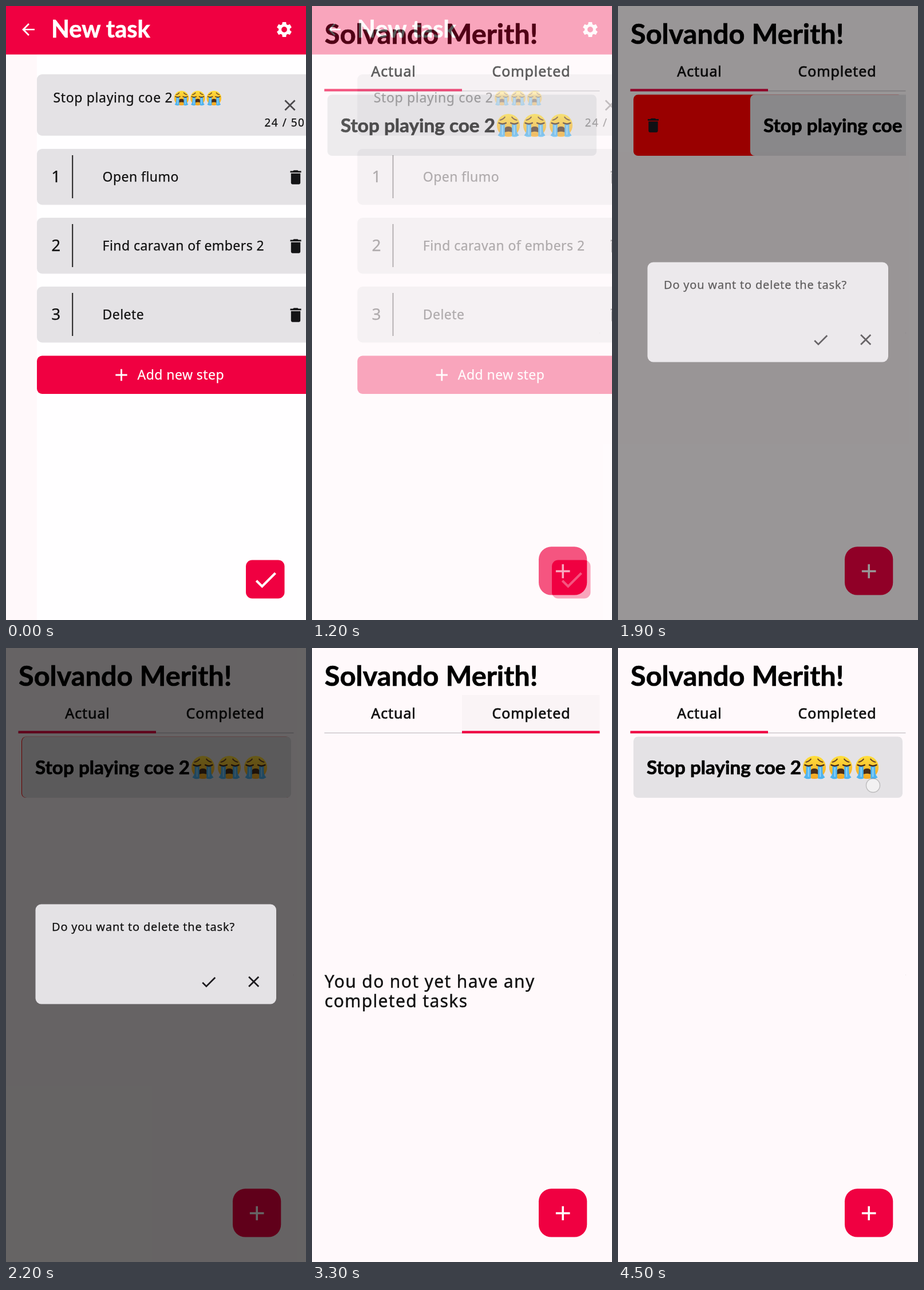
These frames come from a looping animation (524x1070 px, 5100 ms). An HTML page:

```html
<!DOCTYPE html>
<html lang="en">
<head>
<meta charset="utf-8">
<title>Task list</title>
<style>
  html, body { margin: 0; width: 100%; height: 100%; overflow: hidden; background: #fff9fb; }
  svg { display: block; width: 100vw; height: 100vh; }
  text { font-family: "Noto Sans", "Open Sans", sans-serif; font-size: 23px; letter-spacing: .45px; fill: #111; stroke: #111; stroke-width: .25px; white-space: pre; }
  .head { font-family: Lato, "Open Sans", sans-serif; font-weight: 700; letter-spacing: 0; fill: #000; stroke: #000; stroke-width: .7px; }
  .tab { font-size: 25px; letter-spacing: .9px; text-anchor: middle; stroke-width: .7px; }
  .num { font-size: 28px; text-anchor: middle; }
  .note { font-size: 30px; letter-spacing: 1.35px; stroke-width: .4px; }
  .white { fill: #fff; stroke: #fff; }
  .red { fill: #f00041; }
  .alarm { fill: #f00; }
  .card { fill: #e4e2e5; }
</style>
</head>
<body>
<svg viewBox="0 0 524 1070" preserveAspectRatio="none">
  <defs>
    <linearGradient id="skin" x1="0" y1="0" x2="0" y2="1">
      <stop offset="0" stop-color="#ffdf3c"/><stop offset="1" stop-color="#f5a623"/>
    </linearGradient>
    <g id="cry">
      <circle r="19.5" fill="url(#skin)"/>
      <path d="M-14 -9Q-9 -10 -6 -14M14 -9Q9 -10 6 -14" fill="none" stroke="#6b4423" stroke-width="2" stroke-linecap="round"/>
      <path d="M-7 12V7Q-6 2 0 2Q6 2 7 7V12Q0 9 -7 12Z" fill="#4a2d18"/>
      <path d="M-14 -3H-6V19Q-13 21 -18 17Q-14 13 -14 7ZM14 -3H6V19Q13 21 18 17Q14 13 14 7Z" fill="#4fb3ef"/>
      <path d="M-10 0V16M10 0V16" fill="none" stroke="#8fd4fb" stroke-width="2"/>
      <path d="M-16 -4Q-10 -1 -4 -4M16 -4Q10 -1 4 -4" fill="none" stroke="#4a2d18" stroke-width="2.4" stroke-linecap="round"/>
    </g>
    <path id="back" d="M20 11H7.83l5.59-5.59L12 4l-8 8 8 8 1.41-1.41L7.83 13H20z"/>
    <path id="gear" d="M19.14 12.94c.04-.3.06-.61.06-.94 0-.32-.02-.64-.07-.94l2.03-1.58c.18-.14.23-.41.12-.61l-1.92-3.32c-.12-.22-.37-.29-.59-.22l-2.39.96c-.5-.38-1.03-.7-1.62-.94l-.36-2.54c-.04-.24-.24-.41-.48-.41h-3.84c-.24 0-.43.17-.47.41l-.36 2.54c-.59.24-1.13.57-1.62.94l-2.39-.96c-.22-.08-.47 0-.59.22L2.74 8.87c-.12.21-.08.47.12.61l2.03 1.58c-.05.3-.09.63-.09.94s.02.64.07.94l-2.03 1.58c-.18.14-.23.41-.12.61l1.92 3.32c.12.22.37.29.59.22l2.39-.96c.5.38 1.03.7 1.62.94l.36 2.54c.05.24.24.41.48.41h3.84c.24 0 .44-.17.47-.41l.36-2.54c.59-.24 1.13-.56 1.62-.94l2.39.96c.22.08.47 0 .59-.22l1.92-3.32c.12-.22.07-.47-.12-.61zM12 15.6a3.6 3.6 0 1 1 0-7.2 3.6 3.6 0 0 1 0 7.2z"/>
    <path id="bin" d="M6 19c0 1.1.9 2 2 2h8c1.1 0 2-.9 2-2V7H6zM19 4h-3.5l-1-1h-5l-1 1H5v2h14z"/>
    <path id="close" d="M19 6.41L17.59 5 12 10.59 6.41 5 5 6.41 10.59 12 5 17.59 6.41 19 12 13.41 17.59 19 19 17.59 13.41 12z"/>
    <path id="tick" d="M9 16.17L4.83 12l-1.42 1.41L9 19 21 7l-1.41-1.41z"/>
    <path id="plus" d="M19 13h-6v6h-2v-6H5v-2h6V5h2v6h6z"/>
    <path id="pen" d="M3 17.25V21h3.75L17.81 9.94l-3.75-3.75zM20.71 7.04a1 1 0 0 0 0-1.41l-2.34-2.34a1 1 0 0 0-1.41 0l-1.83 1.83 3.75 3.75z"/>
    <clipPath id="pager"><rect x="21" y="149" width="482" height="921"/></clipPath>
  </defs>

  <rect width="524" height="1070" fill="#fff9fb"/>
  <g id="home"></g>
  <g id="dialog"></g>
  <g id="editor"></g>
  <circle id="touch" fill="#fff" fill-opacity=".5" stroke="#777" stroke-opacity=".4" stroke-width="1.4"/>
</svg>
<script>
const $ = id => document.getElementById(id);
const LOOP = 5100, STEP = 100, PAGE = 481;

const icon = (id, cx, cy, fill, s = 1.364) =>
  `<use href="#${id}" fill="${fill}" transform="translate(${cx} ${cy}) scale(${s}) translate(-12 -12)"/>`;
const box = (x, y, w, h, r, cls) =>
  `<rect class="${cls}" x="${x}" y="${y}" width="${w}" height="${h}" rx="${r}"/>`;
const text = (x, y, str, cls = "", style = "") =>
  `<text x="${x}" y="${y}" class="${cls}" style="${style}">${str}</text>`;
const tears = (x, y, gap, s) => [0, 1, 2].map(i =>
  `<use href="#cry" transform="translate(${x + i * gap} ${y}) scale(${s})"/>`).join("");

const stepRow = (label, i) => {
  const y = 249 + i * 120;
  return box(21.5, y, 481, 97.5, 9, "card") +
    text(55, y + 58, i + 1, "num") +
    `<path d="M83.7 ${y + 11}v75" stroke="#222" stroke-width="2"/>` +
    text(136, y + 57, label) +
    icon("bin", 473.5, y + 49.5, "#141416");
};

$("home").innerHTML =
  text(22, 66, "Solvando Merith!", "head", "font-size:48.7px") +
  `<rect id="ripple" y="82" width="240.5" height="66" fill="#000"/>` +
  text(142.5, 123, "Actual", "tab") + text(383, 123, "Completed", "tab") +
  `<path d="M21.5 148H502.5" stroke="#cdc9cc" stroke-width="1.4"/>` +
  `<rect id="mark" class="red" y="144.5" width="240.5" height="4.2"/>` +
  `<g clip-path="url(#pager)"><g id="pages">
     <g id="under">${box(27, 154.5, 470, 106.5, 8, "alarm")}
       ${icon("bin", 61.5, 208, "#1c1a22")}${icon("pen", 462.5, 208, "#2a2d35")}</g>
     <g id="task">${box(27, 154.5, 470, 106.5, 8, "card")}
       ${text(50, 220, "Stop playing coe 2", "head", "font-size:33.3px")}
       ${tears(343, 208, 46, 1.03)}</g>
     <g transform="translate(${PAGE} 0)">
       ${text(22, 592, "You do not yet have any", "note")}
       ${text(22, 625.5, "completed tasks", "note")}</g>
   </g></g>` +
  box(396, 942.3, 84.3, 84.3, 22, "red") + icon("plus", 438.2, 985, "#fff", 1.76);

$("dialog").innerHTML =
  `<rect width="524" height="1070" fill-opacity=".6"/>` +
  box(51.5, 446.5, 420.5, 174, 10, "card") +
  text(80, 492.5, "Do you want to delete the task?", "", "font-size:20px;letter-spacing:.8px") +
  icon("tick", 354, 582, "#1c1a1e") + icon("close", 432.7, 581.5, "#1c1a1e");

$("editor").innerHTML =
  `<rect width="524" height="1070" fill="#fffeff"/>
   <rect id="strip" y="84" height="986" fill="#fff8fa"/>
   <rect class="red" width="524" height="84.5"/>` +
  icon("back", 39, 41, "#fff") + icon("gear", 486, 41, "#fff") +
  text(79, 55, "New task", "head white", "font-size:41.5px") +
  `<g id="form">` +
  box(21.5, 119, 481, 107, 9, "card") +
  text(50, 168, "Stop playing coe 2", "", "letter-spacing:.65px") + tears(274, 160.5, 28.4, .66) +
  icon("close", 463.5, 173, "#4a484b") +
  text(419, 210, "24 / 50", "", "font-size:19px;letter-spacing:1.5px") +
  ["Open flumo", "Find caravan of embers 2", "Delete"].map(stepRow).join("") +
  box(21.5, 609.5, 481, 66.5, 9, "red") +
  icon("plus", 169, 643, "#fff", 1.45) + text(197, 651, "Add new step", "white") +
  `</g>` +
  box(419, 965.5, 67.5, 67, 11, "red") + icon("tick", 453.5, 1000, "#fff", 2.05);

const set = (id, attrs) => { for (const k in attrs) $(id).setAttribute(k, attrs[k]); };
const span = (t, a, b) => Math.min(1, Math.max(0, (t - a) / (b - a)));
const out = p => 1 - (1 - p) ** 3;

// [from, until, x, y, radius]
const taps = [
  [900, 1100, 45, 44, 14],
  [2300, 2500, 448, 583, 13],
  [3000, 3200, 383, 116, 12],
  [3600, 3800, 143, 116, 12],
  [4500, 5100, 445.5, 239.5, 12]
];

function swipe(t) {
  if (t < 1600 || t >= 2400) return 0;
  if (t < 1800) return 130 + 322 * span(t, 1600, 1700);
  return t < 2200 ? 481 * (1 - out(span(t, 1800, 2200))) + 1 : 1;
}

function draw(ms) {
  const t = Math.floor(ms / STEP) * STEP;

  // editor page settles in, then leaves to the right
  const enter = (1 - span(t, 0, 300)) ** 3, leave = span(t, 1000, 1300);
  const shift = 32.5 * enter + 60 * out(leave);
  set("form", { transform: `translate(${shift} 0)` });
  set("strip", { width: 21.5 + shift, opacity: enter });
  set("editor", { opacity: 1 - leave, visibility: leave < 1 ? "visible" : "hidden" });

  // swiped task
  const drag = swipe(t);
  set("task", { transform: `translate(${drag} 0)` });
  set("under", { visibility: drag > 0 ? "inherit" : "hidden" });

  set("dialog", { opacity: span(t, 1700, 2000) * (1 - span(t, 2400, 2600)) });

  // tab pager
  const tab = out(span(t, 3000, 3300)) - out(span(t, 3600, 3900));
  set("pages", { transform: `translate(${-PAGE * tab} 0)` });
  set("mark", { x: 21.5 + 240.5 * tab });
  const start = t < 3600 ? 3000 : 3600;
  const glow = t < start ? 0 : 1 - span(t, start + 200, start + 500);
  set("ripple", { x: t < 3600 ? 262 : 21.5, opacity: .03 * glow });

  let tap = taps.find(p => t >= p[0] && t < p[1]);
  if (t >= 1600 && t < 1800) tap = [0, 0, drag + 20, 203, 12];
  set("touch", tap ? { cx: tap[2], cy: tap[3], r: tap[4], visibility: "visible" } : { visibility: "hidden" });
}

const begin = performance.now();
function frame() {
  draw((performance.now() - begin) % LOOP);
  requestAnimationFrame(frame);
}
frame();
</script>
</body>
</html>
```
